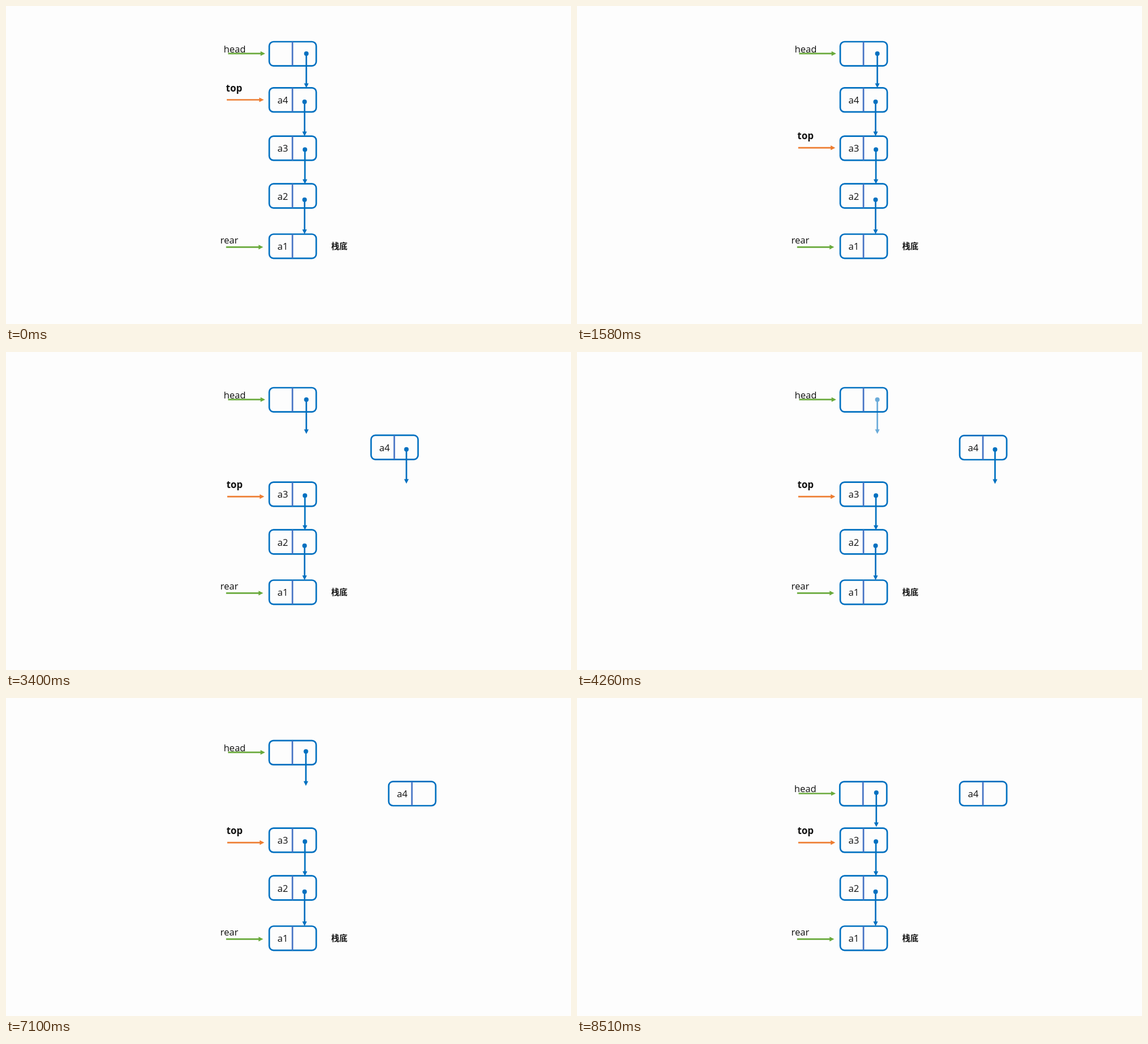
An HTML page that plays this animation: 998x561 px, repeating every 8540 ms.

```html
<!DOCTYPE html>
<html lang="zh">
<head>
<meta charset="utf-8">
<style>
html, body { margin: 0; width: 100%; height: 100%; overflow: hidden; background: #fdfdfd; }
svg { display: block; }
text { font: 16.6px "Open Sans", "Noto Sans", sans-serif; fill: #111; }
.top { font-weight: 700; font-size: 17px; }
.zh { font: 700 14.3px "Noto Sans CJK SC", "Noto Sans CJK", sans-serif; }
</style>
</head>
<body>
<svg width="998" height="561" viewBox="0 0 998 561" fill="none" stroke-width="2.7">
  <g id="stack"></g>
  <g id="head"></g>
  <g id="a4"></g>
  <g id="link"></g>
  <g id="headLink"></g>
  <g id="top"></g>
</svg>
<script>
const LOOP = 8540, MOVE = 1745, FADE = 436;
const BLUE = '#0070c0', GREEN = '#6aaa3c', ORANGE = '#ed7d31';
const $ = id => document.getElementById(id);
const add = (id, markup) => $(id).insertAdjacentHTML('beforeend', markup);

const label = (x, y, s, cls = '') => `<text x="${x}" y="${y}" class="${cls}">${s}</text>`;

const node = (y, s) =>
  `<rect x="465" y="${y}" width="83" height="42.6" rx="7.5" stroke="${BLUE}"/>` +
  `<path d="M506 ${y}v42.6" stroke="#4472c4"/>` + label(479.5, y + 27.8, s);

const link = (x, y) =>
  `<circle cx="${x}" cy="${y}" r="4" fill="${BLUE}"/>` +
  `<path d="M${x} ${y}v54" stroke="${BLUE}"/>` +
  `<path d="M${x - 4.1} ${y + 52.5}h8.2l-4.1 8.2z" fill="${BLUE}"/>`;

const pointer = (x, y, color) =>
  `<path d="M${x} ${y}h59" stroke="${color}"/>` +
  `<path d="M${x + 57.3} ${y - 4.1}v8.2l8.2 -4.1z" fill="${color}"/>`;

add('stack', node(229.6, 'a3') + node(313.7, 'a2') + node(402.5, 'a1') +
  link(528, 253.3) + link(527.4, 341.7) +
  label(378.5, 419, 'rear') + pointer(388.8, 425.3, GREEN) +
  label(574.5, 429.2, '栈底', 'zh'));
add('head', node(63, '') + label(384.5, 81.5, 'head') + pointer(392.3, 83.9, GREEN));
add('headLink', link(530.5, 83.9));
add('a4', node(144.3, 'a4'));
add('link', link(527.4, 169));
add('top', label(388.6, 150.6, 'top', 'top') + pointer(390, 165.5, ORANGE));

// Constant acceleration to the midpoint, then constant deceleration.
function ease(t, start) {
  const u = Math.min(1, Math.max(0, (t - start) / MOVE));
  return u < .5 ? 2 * u * u : 1 - 2 * (1 - u) ** 2;
}
const shift = (id, x, y) => $(id).setAttribute('transform', `translate(${x} ${y})`);

function draw(now) {
  const t = now % LOOP;
  const topMove = ease(t, 125), popMove = ease(t, 2130);
  const linkMove = ease(t, 4665), headMove = ease(t, 6635);
  shift('top', .8 * topMove, 89.6 * topMove);
  shift('a4', 211 * popMove, 3.1 * popMove);
  shift('head', -.8 * headMove, 84.6 * headMove);
  shift('link', 211 * popMove - 208.5 * linkMove - 1.2 * headMove,
    3.1 * popMove - 90 * linkMove + 84.8 * headMove);
  $('headLink').setAttribute('opacity', Math.min(1, Math.max(0, 1 - (t - 4077) / FADE)));
  requestAnimationFrame(draw);
}
requestAnimationFrame(draw);
</script>
</body>
</html>
```
